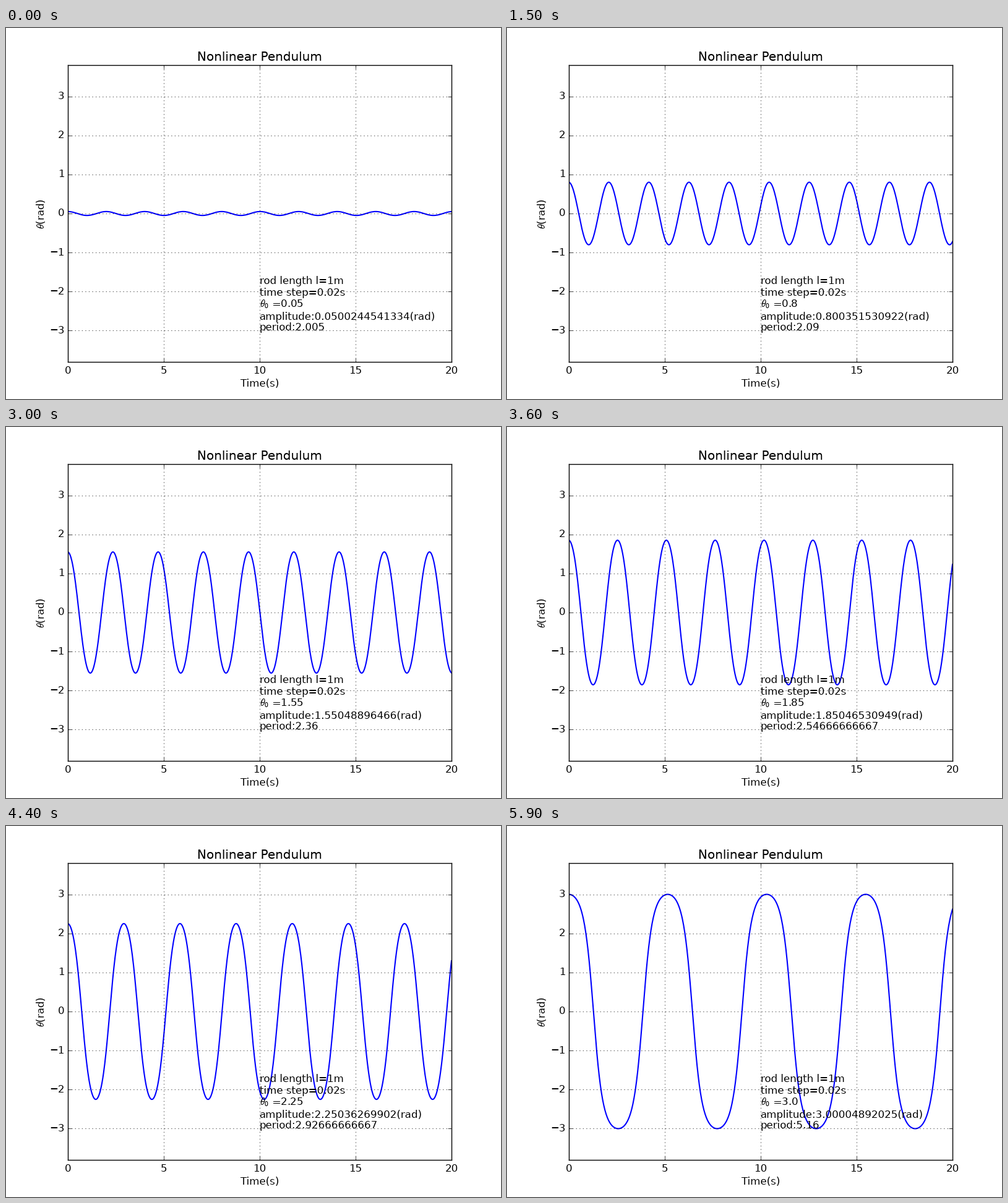
A matplotlib script for the animation above (6000 ms loop, 800 by 600 pixels).

```python
import numpy as np
import matplotlib.pyplot as plt
from matplotlib.animation import FuncAnimation

plt.style.use("classic")
plt.rcParams.update({
    "figure.facecolor": "white",
    "font.family": "DejaVu Sans",
    "text.hinting": "native",
    "axes.labelpad": 3,
})

FRAMES, INTERVAL = 60, 100
G, ROD, DT, T_END = 9.8, 1.0, 0.02, 20.0
STEPS = round(T_END / DT)
START = 0.05 * np.arange(1, FRAMES + 1)


def swing(theta0):
    """Euler-Cromer solution, one row per time step."""
    theta = np.empty((STEPS + 1, len(theta0)))
    theta[0] = theta0
    omega = np.zeros(len(theta0))
    for n in range(STEPS):
        omega = omega - G / ROD * np.sin(theta[n]) * DT
        theta[n + 1] = theta[n] + omega * DT
    return theta


def mean_period(theta):
    """Average time between peaks over the first half of the run."""
    speed = np.gradient(theta[:STEPS // 2])
    peaks = np.flatnonzero((speed[1:-1] > 0) & (speed[2:] <= 0)) + 2
    return peaks[-1] * DT / len(peaks)


time = np.arange(STEPS + 1) * DT
curves = swing(START)

fig = plt.figure(figsize=(8, 6), dpi=100)
ax = fig.add_axes([0.125, 0.1, 0.775, 0.8])
ax.set_xlim(0, 20)
ax.set_ylim(-3.8, 3.8)
ax.set_xticks(range(0, 21, 5))
ax.set_yticks(range(-3, 4))
ax.grid(True)
ax.set_title("Nonlinear Pendulum")
ax.set_xlabel("Time(s)")
ax.set_ylabel(r"$\theta$(rad)")

line, = ax.plot([], [], color="b", lw=1.5)
ax.text(10, -1.8, "rod length l=1m")
ax.text(10, -2.1, "time step=0.02s")
start_text = ax.text(10, -2.4, "")
amp_text = ax.text(9.97, -2.72, "")
period_text = ax.text(9.97, -3.0, "")


def update(i):
    theta = curves[:, i]
    line.set_data(time, theta)
    start_text.set_text(rf"$\theta_0\,=\!${round(float(START[i]), 2)}")
    amp_text.set_text(f"amplitude:{theta.max():.12g}(rad)")
    period_text.set_text(f"period:{mean_period(theta):.12g}")
    return line, start_text, amp_text, period_text


anim = FuncAnimation(fig, update, frames=FRAMES, interval=INTERVAL,
                     repeat=True, repeat_delay=0)
plt.show()
```
